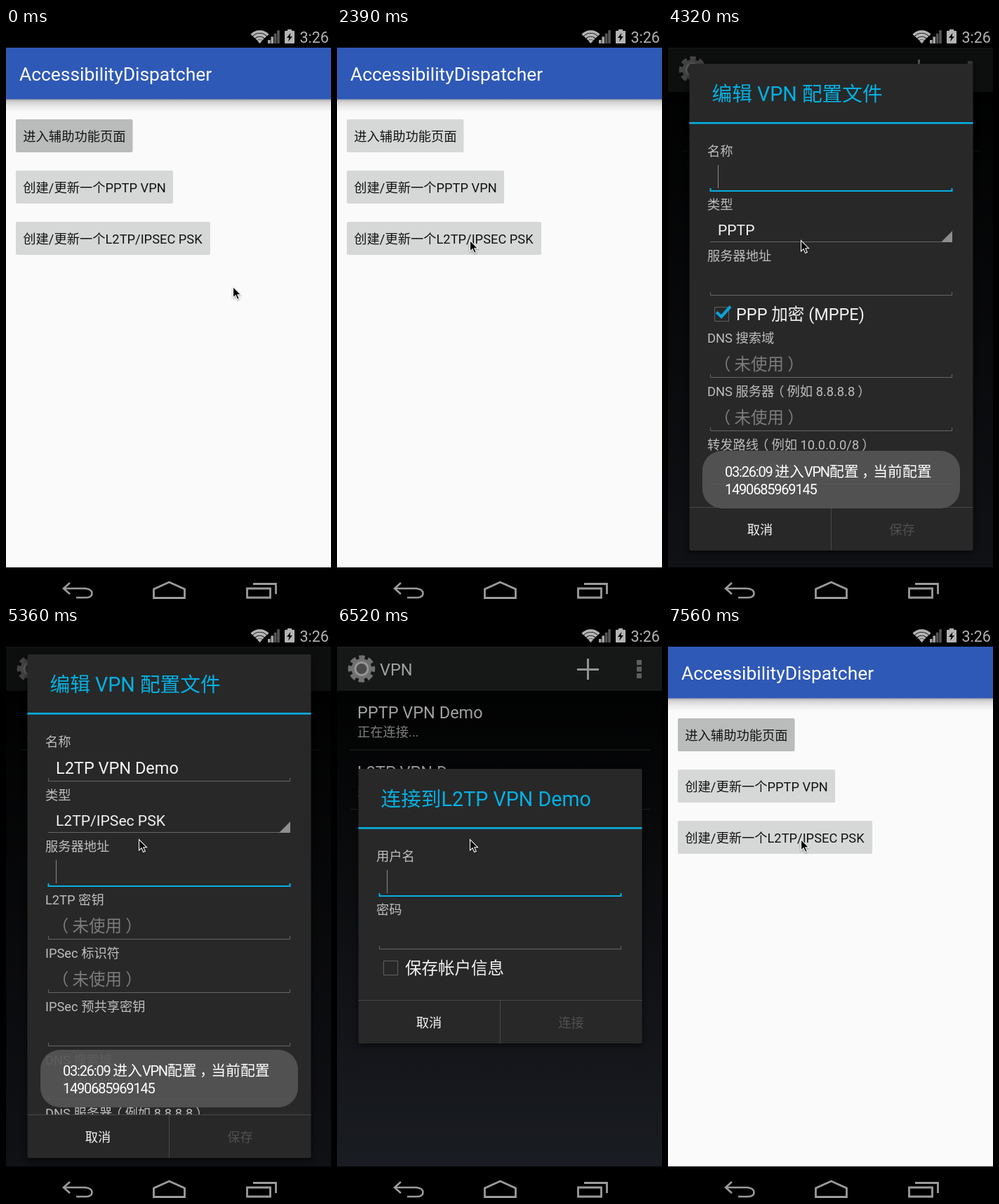
An HTML page for the animation above (8 s loop, 463 by 813 pixels).

```html
<!DOCTYPE html>
<html lang="zh">
<head>
<meta charset="utf-8">
<title>VPN setup</title>
<style>
html, body { margin: 0; width: 100%; height: 100%; overflow: hidden; background: #000; }
svg { display: block; }
text { font-family: Roboto, "Noto Sans CJK SC", "Noto Sans CJK", sans-serif; white-space: pre; }
.panel { filter: drop-shadow(0 3px 4px rgba(0, 0, 0, .6)); }
.narrow { font-size: 20px; letter-spacing: -1.2px; }
</style>
</head>
<body>
<svg id="stage" width="100%" height="100%" viewBox="0 0 463 813"></svg>
<script>
const LOOP = 8000;
const CENTER = { x: 232.5, y: 397.5 };
const BLUE = '#05b0e2';
const SMALL = 18.3, MEDIUM = 21.1, LARGE = 23.5, TITLE = 28.7;

// Full-width punctuation sits in the middle of its cell
const centred = content => content.replace(/[（），]/g, mark => {
  const shift = mark === '（' ? -.22 : .22;
  return `<tspan dx="${shift}em">${mark}</tspan><tspan dx="${-shift}em">\u200b</tspan>`;
});
const text = (x, y, size, fill, content, extra = '') =>
  `<text x="${x}" y="${y}" font-size="${size}" fill="${fill}" ${extra}>${centred(content)}</text>`;
const rect = (x, y, w, h, fill, extra = '') =>
  `<rect x="${x}" y="${y}" width="${w}" height="${h}" fill="${fill}" ${extra}/>`;
const stroke = (d, color, width = 1) =>
  `<path d="${d}" fill="none" stroke="${color}" stroke-width="${width}"/>`;

// System bars
function statusBar() {
  const arcs = [16, 11.3, 6.6].map(r =>
    stroke(`M${361.5 - r * .73} ${21 - r * .68} A${r} ${r} 0 0 1 ${361.5 + r * .73} ${21 - r * .68}`, '#b4b4b4', 3.8)).join('');
  const bars = [0, 1, 2, 3].map(i =>
    rect(373 + 4.4 * i, 17 - 4.6 * i, 3.6, 5 + 4.6 * i, i < 2 ? '#a4a4a4' : '#555')).join('');
  return rect(0, 0, 463, 28, '#000') + arcs +
    '<path d="M361.5 22L358 18Q361.5 15 365 18Z" fill="#b4b4b4"/>' + bars +
    rect(397, 4, 14, 18, '#b4b4b4', 'rx="1"') + rect(401, 2, 6, 3, '#b4b4b4') +
    '<path d="M405.5 7L400 14H403.5L402 19.5L408 12H404.5Z" fill="#000"/>' +
    text(418.5, 21, 21.5, '#b4b4b4', '3:26');
}

function navBar() {
  return rect(0, 768, 463, 45, '#000') +
    stroke('M91 790L82 798L91 806M82 798H113Q122.5 799 122.5 805Q122.5 811 114 811H100', '#9b9b9b', 2.6) +
    stroke('M210.5 811.5V799L232.5 789L254.5 799V811.5Z', '#9b9b9b', 2.8) +
    stroke('M343.5 798H376.5V811H343.5ZM352 791.5H384.5V806', '#9b9b9b', 2.8);
}

// App screen with three buttons
function homeScreen() {
  const button = (y, width, label, id = '') =>
    rect(14, y, width, 47, '#d6d8d7', `rx="2" ${id}`) + text(24.3, y + 31, SMALL, '#131313', label);
  return rect(0, 28, 463, 740, '#fafafa') +
    rect(0, 101, 463, 17, 'url(#shade)') +
    rect(0, 28, 463, 73.5, '#2f59b7') +
    text(19, 75, 26.4, '#fff', 'AccessibilityDispatcher') +
    button(130, 166.5, '进入辅助功能页面', 'id="firstButton"') +
    button(203, 224, '创建/更新一个PPTP VPN') +
    button(276, 277, '创建/更新一个L2TP/IPSEC PSK');
}

// VPN list
function settingsScreen() {
  const row = (y, name, note) =>
    text(29, y, LARGE, '#f3f3f3', name) + text(29, y + 26, SMALL, '#bebebe', note) +
    rect(19, y + 44.5, 427, 1, '#2c2e30');
  const dots = [47, 56.5, 66].map(y => rect(427, y, 7, 7, '#8f8f8f')).join('');
  return rect(0, 28, 463, 740, 'url(#night)') +
    rect(0, 28, 463, 63, '#212323') + rect(0, 28, 463, 1.5, '#2d2f2f') +
    '<circle cx="35" cy="59.5" r="16" fill="none" stroke="#aaa" stroke-width="6.5" stroke-dasharray="8 4.566" stroke-dashoffset="4"/>' +
    '<circle cx="35" cy="59.5" r="14.5" fill="#aaa"/>' +
    '<circle cx="35" cy="59.5" r="9" fill="#707070" stroke="#e2e2e2" stroke-width="3"/>' +
    text(61, 69, LARGE, '#f3f3f3', 'VPN') +
    stroke('M342 60.5H373M357.5 45V75', '#dedede', 3) + dots +
    row(130, 'PPTP VPN Demo', '正在连接...') +
    `<g id="newRow">${row(214.5, 'L2TP VPN Demo', '采用预共享密钥的 L2TP/IPSec VPN')}</g>`;
}

// Dialog rows: draw at y and return the advance to the next row
const edit = (label, value = '', hint = '', focused = false) => y => ({
  advance: 76,
  markup: text(56, y + 6.5, SMALL, '#bebebe', label) +
    (value ? text(71, y + 46, LARGE, '#f3f3f3', value) : '') +
    (hint ? text(71, y + 46, LARGE, '#7c7c7c', hint) : '') +
    (focused
      ? stroke(`M60.5 ${y + 53}V${y + 57}H404.5V${y + 53}`, BLUE, 2) + rect(71, y + 20, 1, 33, '#8a8a8a')
      : stroke(`M60.5 ${y + 52}V${y + 56.5}H404.5V${y + 52}`, '#666'))
});
const focusedEdit = label => edit(label, '', '', true);
const unused = label => edit(label, '', '（未使用）');
const spinner = (label, value) => y => ({
  advance: 73,
  markup: text(56, y + 6.5, SMALL, '#bebebe', label) + text(71, y + 43.5, MEDIUM, '#f3f3f3', value) +
    stroke(`M60 ${y + 53.5}H405`, '#666') + `<path d="M405 ${y + 38}V${y + 54}H389Z" fill="#8e8e8e"/>`
});
const checkbox = (label, checked) => y => ({
  advance: 41,
  markup: rect(66.5, y - 2.5, 20, 20, 'none', 'stroke="#606060"') +
    (checked ? stroke(`M69 ${y + 4.5}L76 ${y + 11}L89 ${y - 3.5}`, '#0d9fd8', 4.2) : '') +
    text(97, y + 16, LARGE, '#f3f3f3', label)
});

function dialog(id, height, title, action, rows) {
  const top = CENTER.y - height / 2, bottom = top + height;
  let y = 124, body = '';
  for (const row of rows) {
    const { markup, advance } = row(y);
    body += markup;
    y += advance;
  }
  return `<g id="${id}">` +
    rect(30.5, top, 404, height, '#282828', 'rx="2" class="panel"') +
    `<svg x="0" y="${top}" width="463" height="${height - 62}">` +
    text(62.5, 52.5, TITLE, BLUE, title) + rect(30.5, 83, 404, 2.6, BLUE) + body + '</svg>' +
    rect(30.5, bottom - 62, 404, 1, '#484848') + rect(232, bottom - 62, 1, 62, '#484848') +
    text(131, bottom - 23.5, SMALL, '#f3f3f3', '取消', 'text-anchor="middle"') +
    text(333.5, bottom - 23.5, SMALL, '#505050', action, 'text-anchor="middle"') + '</g>';
}

function dialogs() {
  const editTitle = '编辑 VPN 配置文件';
  const mppe = checkbox('PPP 加密 (MPPE)', true);
  const network = [
    unused('DNS 搜索域'),
    unused('DNS 服务器（例如 8.8.8.8）'),
    unused('转发路线（例如 10.0.0.0/8）')
  ];
  const server = edit('服务器地址'), pptp = spinner('类型', 'PPTP');
  const named = edit('名称', 'L2TP VPN Demo');
  return dialog('basic', 505, editTitle, '保存',
      [focusedEdit('名称'), pptp, server, mppe, checkbox('显示高级选项', false)]) +
    dialog('advanced', 693, editTitle, '保存', [focusedEdit('名称'), pptp, server, mppe, ...network]) +
    dialog('named', 693, editTitle, '保存', [named, pptp, focusedEdit('服务器地址'), mppe, ...network]) +
    dialog('l2tp', 717, editTitle, '保存',
      [named, spinner('类型', 'L2TP/IPSec PSK'), focusedEdit('服务器地址'), unused('L2TP 密钥'),
       unused('IPSec 标识符'), edit('IPSec 预共享密钥'), ...network]) +
    dialog('connect', 391, '连接到L2TP VPN Demo', '连接',
      [focusedEdit('用户名'), edit('密码'), checkbox('保存帐户信息', false)]);
}

function toast() {
  const narrow = s => `<tspan class="narrow">${s}</tspan>`;
  return rect(49, 602, 367, 82, '#555', 'rx="28" opacity=".92"') +
    text(81, 638.8, 20.8, '#fff', `${narrow('03:26:09 ')}进入${narrow('VPN')}配置，当前配置`) +
    text(81, 663.5, 20.8, '#fff', narrow('1490685969145'));
}

const stage = document.getElementById('stage');
stage.innerHTML = `
  <defs>
    <linearGradient id="shade" x2="0" y2="1">
      <stop stop-color="#a9a9a9"/><stop offset=".25" stop-color="#d2d2d2"/>
      <stop offset=".65" stop-color="#ebebeb"/><stop offset="1" stop-color="#f6f6f6"/>
    </linearGradient>
    <linearGradient id="night" x2="0" y2="1">
      <stop stop-color="#000"/><stop offset=".1" stop-color="#020303"/><stop offset="1" stop-color="#272b34"/>
    </linearGradient>
  </defs>
  <g id="home">${homeScreen()}</g>
  <g id="settings">${settingsScreen()}</g>
  ${rect(0, 28, 463, 740, '#000', 'id="dim"')}
  <g id="dialogLayer">${dialogs()}</g>
  <g id="toast">${toast()}</g>
  ${statusBar()}${navBar()}
  <path id="pointer" d="M0 0V15.5L3.6 12.2L6.2 18L8.8 16.9L6.3 11.2H11Z"
    fill="#000" stroke="#fff" stroke-width="1.1" style="filter:drop-shadow(0 1px 1px rgba(0,0,0,.4))"/>`;

const el = Object.fromEntries([...stage.querySelectorAll('[id]')].map(node => [node.id, node]));
const dialogIds = ['basic', 'advanced', 'named', 'l2tp', 'connect'];

// Each entry changes only the listed properties of the running state
const timeline = [
  [0, { focus: true, settings: 0, zoom: 1, dim: 0, dialog: '', alpha: 1, scale: 1, toast: 0, newRow: false }],
  [2390, { focus: false }],
  [2840, { settings: .6, zoom: .94 }],
  [2980, { settings: 1, zoom: 1 }],
  [3280, { dialog: 'basic', alpha: .54, scale: .953, dim: .07 }],
  [3430, { alpha: 1, scale: 1, dim: .35 }],
  [3580, { dim: .6 }],
  [3730, { toast: .5 }],
  [3870, { toast: 1 }],
  [4320, { dialog: 'advanced' }],
  [4470, { dialog: 'named' }],
  [4770, { dialog: 'l2tp' }],
  [5500, { alpha: .5, scale: .97, dim: .45 }],
  [5650, { dialog: '', dim: .2 }],
  [5800, { dim: 0, newRow: true }],
  [5940, { toast: .7 }],
  [6090, { toast: .35 }],
  [6230, { toast: 0 }],
  [6520, { dialog: 'connect', alpha: 1, scale: 1, dim: .34 }],
  [6670, { dim: .53 }],
  [6820, { dim: .6 }],
  [6960, { alpha: .5, scale: .97, dim: .4 }],
  [7110, { dialog: '', dim: .15 }],
  [7260, { dim: 0 }],
  [7410, { settings: .4, zoom: .94, focus: true }],
  [7560, { settings: 0 }]
];

const scaled = s => `translate(${CENTER.x} ${CENTER.y}) scale(${s}) translate(${-CENTER.x} ${-CENTER.y})`;
const show = (node, opacity) => {
  node.style.display = opacity ? '' : 'none';
  node.setAttribute('opacity', opacity);
};

function draw(t) {
  const state = Object.assign({}, ...timeline.filter(([time]) => time <= t).map(([, change]) => change));
  el.firstButton.setAttribute('fill', state.focus ? '#babcbb' : '#d6d8d7');
  show(el.settings, state.settings);
  el.settings.setAttribute('transform', scaled(state.zoom));
  show(el.newRow, +state.newRow);
  show(el.dim, state.dim);
  show(el.dialogLayer, state.alpha);
  el.dialogLayer.setAttribute('transform', scaled(state.scale));
  for (const id of dialogIds) el[id].style.display = id === state.dialog ? '' : 'none';
  show(el.toast, state.toast);

  const step = Math.max(0, Math.min(8, Math.floor((t - 600) / 150) + 1));
  el.pointer.setAttribute('transform',
    `translate(${323.5 - 134 * step / 8} ${368.5 - 66 * Math.min(step, 7) / 7})`);
}

const start = performance.now();
function tick() {
  draw((performance.now() - start) % LOOP);
  requestAnimationFrame(tick);
}
tick();
</script>
</body>
</html>
```
